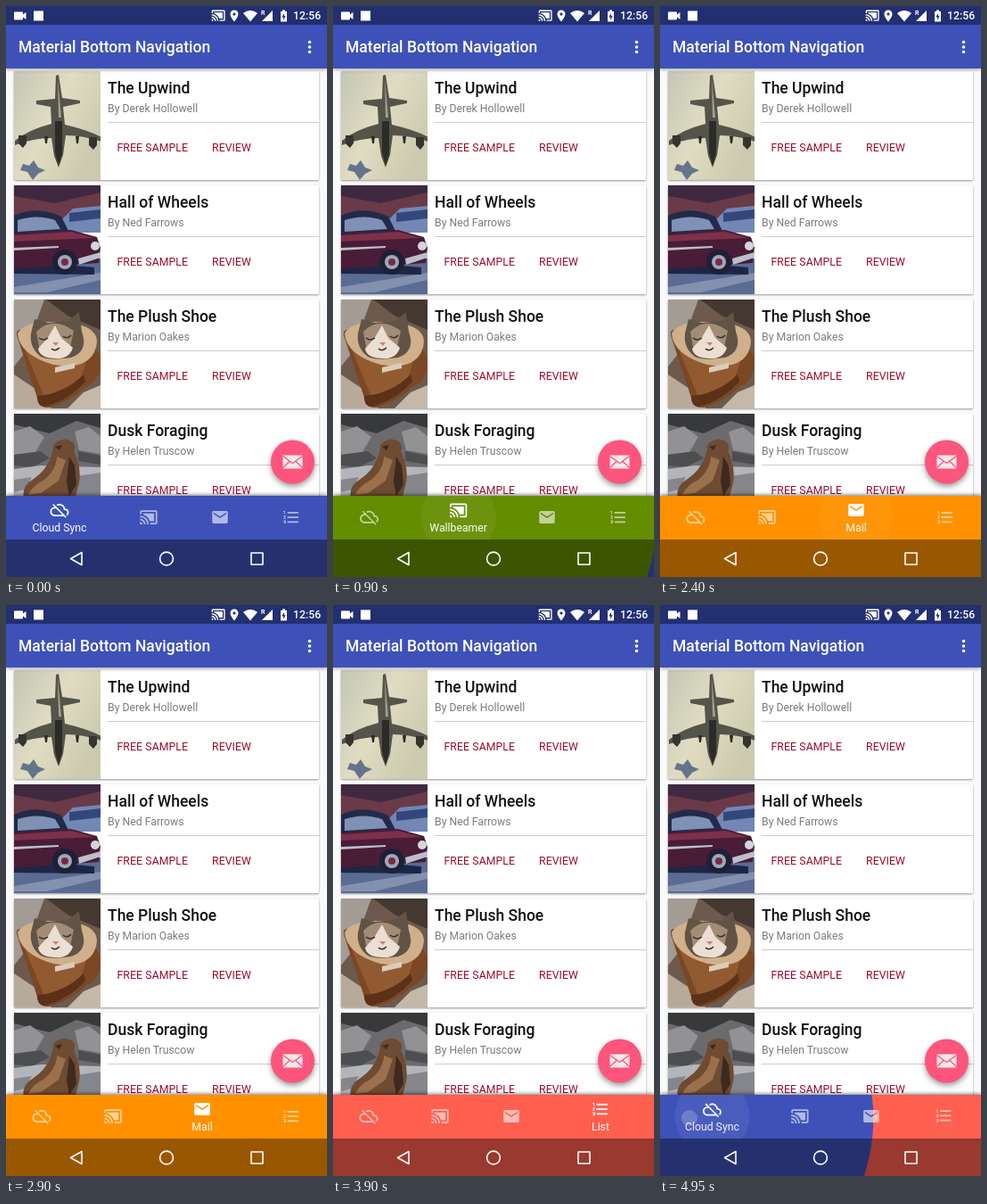
Recreate the animation shown at these times as an HTML page. Size 360 by 640 pixels, loop 5 s.

```html
<!DOCTYPE html>
<html lang="en">
<head>
<meta charset="utf-8">
<title>Material Bottom Navigation</title>
<style>
  html, body { margin: 0; width: 100%; height: 100%; overflow: hidden; }
  svg { display: block; }
  text { font: 400 12.25px Roboto, sans-serif; }
  .title { font-weight: 500; font-size: 17.5px; }
  .by { fill: #7b7b7b; }
  .action { fill: #9c0a2c; letter-spacing: .1px; }
  .card { fill: #fff; filter: drop-shadow(0 1px 1.2px #0006); }
  .raised { filter: drop-shadow(0 1px 2px #0006); }
  .label { fill: #fff; text-anchor: middle; }
</style>
</head>
<body>
<svg id="stage" width="360" height="640" viewBox="0 0 360 640">
  <defs>
    <clipPath id="barClip"><rect y="549" width="360" height="91"/></clipPath>
    <clipPath id="tabClip"><rect y="549" width="360" height="49"/></clipPath>
    <path id="cloud" d="M19.35 10.04C18.67 6.59 15.64 4 12 4c-1.48 0-2.85.43-4.01 1.17l1.46 1.46C10.21 6.23 11.08 6 12 6c3.04 0 5.5 2.46 5.5 5.5v.5H19c1.66 0 3 1.34 3 3 0 1.13-.64 2.11-1.56 2.62l1.45 1.45C23.16 18.16 24 16.68 24 15c0-2.64-2.05-4.78-4.65-4.96zM3 5.27l2.75 2.74C2.56 8.15 0 10.77 0 14c0 3.31 2.69 6 6 6h11.73l2 2L21 20.73 4.27 4 3 5.27zM7.73 10l8 8H6c-2.21 0-4-1.79-4-4s1.79-4 4-4h1.73z"/>
    <path id="cast" d="M1 18v3h3c0-1.66-1.34-3-3-3zm0-4v2c2.76 0 5 2.24 5 5h2c0-3.87-3.13-7-7-7zm18-7H5v1.63c3.96 1.28 7.09 4.41 8.37 8.37H19V7zM1 10v2c4.97 0 9 4.03 9 9h2c0-6.08-4.93-11-11-11zm20-7H3c-1.1 0-2 .9-2 2v3h2V5h18v14h-7v2h7c1.1 0 2-.9 2-2V5c0-1.1-.9-2-2-2z"/>
    <path id="mail" d="M20 4H4c-1.1 0-1.99.9-1.99 2L2 18c0 1.1.9 2 2 2h16c1.1 0 2-.9 2-2V6c0-1.1-.9-2-2-2zm0 4l-8 5-8-5V6l8 5 8-5v2z"/>
    <path id="list" d="M2 17h2v.5H3v1h1v.5H2v1h3v-4H2v1zm1-9h1V4H2v1h1v3zm-1 3h1.8L2 13.1v.9h3v-1H3.2L5 10.9V10H2v1zm5-6v2h14V5H7zm0 14h14v-2H7v2zm0-6h14v-2H7v2z"/>
    <linearGradient id="haze" x2="1" y2=".6">
      <stop stop-color="#c3c6b4"/><stop offset=".5" stop-color="#e0dcc2"/><stop offset="1" stop-color="#cbcaae"/>
    </linearGradient>

    <symbol id="plane" viewBox="0 0 97 122">
      <path fill="url(#haze)" d="M0 0h97v122H0z"/>
      <path fill="#64748a" d="M10 104l7 2 5-6 5 8 8 3-8 4-6 7-6-9-8-2z"/>
      <path fill="#55544a" d="M25 33l21-2 1-26 3-1 4 26 20 3v3l-19 4 2 20q26 6 41 14v5q-20-7-40-7l-3 22-5 14-5-13-3-20q-20 0-41 8v-5q14-12 41-19l-1-19-16-3z"/>
      <path fill="#2b2c27" d="M46 56h8l0 36-4 14-4-15zM34 73h4l-1 8h-2zM69 73h4l-1 8h-2z"/>
      <path fill="#34352f" d="M5 72h9v9l-4 5-5-5zM84 74h9v9l-4 5-5-5z"/>
      <path fill="#a3a18f" d="M49 8l4 44-3 0z"/>
    </symbol>

    <symbol id="car" viewBox="0 0 97 122">
      <path fill="#6a3a49" d="M0 0h97v40H0z"/>
      <path fill="#3f2940" d="M0 0h97v8L45 20 0 12z"/>
      <path fill="#7387b4" d="M52 40l14-14 31-3v30H50z"/>
      <path fill="#34477a" d="M62 31l35-4v10l-35 4z"/>
      <path fill="#5a6b94" d="M0 82h97v40H0z"/>
      <path fill="#8390ae" d="M0 114l97-16v8l-60 14H0z"/>
      <path fill="#1d2745" d="M0 84l90 8v8L0 99z"/>
      <path fill="#222a4a" d="M0 34q25-12 53 1l9 18-62 4z"/>
      <path fill="#7f91b5" d="M4 39q22-7 42 0l6 10-48 3z"/>
      <path fill="#491c38" d="M0 54l64-4 29 8 4 12-2 17-97 7z"/>
      <path fill="#7d3049" d="M0 56l64-4 26 7-90 4z"/>
      <path fill="#bac0ca" d="M0 70l50-2v2L0 73zM72 82l25-7v6l-24 8z"/>
      <circle cx="57" cy="86" r="14" fill="#1d2135"/>
      <circle cx="57" cy="86" r="8" fill="#9fa7bb"/>
      <circle cx="57" cy="86" r="4" fill="#7d2841"/>
      <circle cx="91" cy="68" r="5" fill="#d4d6dc"/>
    </symbol>

    <symbol id="kitten" viewBox="0 0 97 122">
      <path fill="#6d5a4d" d="M0 0h97v122H0z"/>
      <path fill="#a39c94" d="M0 0h34L12 60 0 75z"/>
      <path fill="#443830" d="M36 0h61v34L60 18z"/>
      <path fill="#b8aa99" d="M0 84l30 20 12 18H0z"/>
      <path fill="#c4b8a9" d="M60 122l18-18 19-8v26z"/>
      <path fill="#7b4725" d="M4 43q-4-12 8-8l72 17q10 4 13 14 2 24-17 32-16 16-40 23-13 1-14-11z"/>
      <path fill="#925a31" d="M6 42l76 24-8 26-40 17z"/>
      <path fill="#5b3118" d="M26 108q30-2 52-24l2 8q-20 22-46 28-8 0-8-12z"/>
      <path fill="#cfb08a" d="M4 38Q16 18 76 29q24 8 14 30-10 20-46 14Q6 62 4 38z"/>
      <path fill="#625347" d="M19 38l4-16 15 4 22-2 13-10 3 22q8 22-12 29-24 4-34-1-13-10-11-26z"/>
      <path fill="#a28c76" d="M25 36q18-18 42-1l-4 18H28z"/>
      <path fill="#eadfd2" d="M37 44l9-15 7 14 13 11q-4 13-19 12-18 0-20-11z"/>
      <path fill="none" stroke="#3c3029" stroke-width="1.6" d="M28 43q5 4 10 0M55 41q5 4 9-1M42 55q4 4 9-1"/>
      <path fill="#c58479" d="M43 48h7l-3 4z"/>
      <path fill="#d9cdb9" d="M46 76l22-5v6l-22 5z"/>
    </symbol>

    <symbol id="bear" viewBox="0 0 97 122">
      <path fill="#6b6b6d" d="M0 0h97v122H0z"/>
      <path fill="#38393b" d="M0 0h97v16L70 8 40 22 0 12z"/>
      <path fill="#929295" d="M0 20l18-6 16 12-10 17-24 3zM68 20l16-5 13 10v20l-24-4z"/>
      <path fill="#4d4e50" d="M0 46l30-4 10 8-20 10-20-2zM72 42l25 5v10l-25-4z"/>
      <path fill="#b4b5ba" d="M0 62l30-4 67 2v62H0z"/>
      <path fill="#84868c" d="M70 70l27-4v26H64zM0 74l20-3-8 14-12 3z"/>
      <path fill="#6f4b32" d="M44 39q-1-4 3-7 10-7 19 0 4 4 1 10 9 18 6 35l-4 16-58 2q-3-14 11-22 18-12 22-34z"/>
      <path fill="#9b714d" d="M48 48l10 4-8 23-20 14-14 2q4-10 18-17 14-12 14-26z"/>
      <path fill="#3d2a20" d="M62 48l6 10 2 22-8 12-3-16zM46 37l8-2-3 6z"/>
    </symbol>
  </defs>

  <rect width="360" height="640" fill="#fafafa"/>
  <g id="cards"></g>

  <g class="raised">
    <rect width="360" height="70" fill="#3d51b8"/>
    <rect width="360" height="21" fill="#222f70"/>
  </g>
  <g fill="#fff">
    <path d="M9 7.500q0-1 1-1h8q1 0 1 1v2l3.500-2.500v8L19 12.500v2q0 1-1 1h-8q-1 0-1-1z"/>
    <rect x="31" y="5.500" width="11" height="11"/>
    <use href="#cast" transform="translate(230 2.500) scale(.68)"/>
    <path d="M256 4.500a4.500 4.500 0 0 0-4.500 4.500c0 3.500 4.500 8.500 4.500 8.500s4.500-5 4.500-8.500a4.500 4.500 0 0 0-4.500-4.500zm0 3a1.600 1.600 0 0 1 0 3.200 1.600 1.600 0 0 1 0-3.200z"/>
    <path d="M266 8q8-6 16 0l-8 9.500z"/>
    <path d="M299 5v12h-12z"/>
    <text x="286" y="10" style="font-size:7px;font-weight:700">R</text>
    <path d="M308 6h2V4.500h3V6h2v11.500h-7zm4 2l-2.600 4.500h1.700V16l2.600-4.800H312z"/>
    <text x="322" y="15" style="font-weight:500">12:56</text>
    <text class="title" x="14" y="52">Material Bottom Navigation</text>
    <circle cx="340.500" cy="40.500" r="1.800"/><circle cx="340.500" cy="46" r="1.800"/><circle cx="340.500" cy="51.500" r="1.800"/>
  </g>

  <circle cx="321.500" cy="511" r="24.500" fill="#fd557b" style="filter:drop-shadow(0 3px 3px #0006)"/>
  <rect x="310.500" y="503.500" width="22" height="15" rx="1" fill="#f3e9ec"/>
  <path d="M310.500 504.500l11 8 11-8M310.500 517.500l7.500-7M332.500 517.500l-7.500-7" fill="none" stroke="#fd557b" stroke-width="1.300"/>

  <rect id="base" y="549" width="360" height="91" style="filter:drop-shadow(0 -1px 2px #0008)"/>
  <g clip-path="url(#barClip)">
    <circle id="reveal"/>
    <rect y="598" width="360" height="42" opacity=".4"/>
  </g>
  <g clip-path="url(#tabClip)" fill="#fff">
    <circle id="ripple" cy="573"/>
    <circle id="touch" r="9"/>
  </g>
  <g id="tabs"></g>
  <g fill="none" stroke="#fff" stroke-width="1.600" stroke-linejoin="round">
    <path d="M72.500 619.500l12.500-7v14zM275 613h13v13h-13z"/>
    <circle cx="180" cy="619.500" r="7.400"/>
  </g>
</svg>
<script>
const $ = id => document.getElementById(id);
const set = (el, attrs) => { for (const k in attrs) el.setAttribute(k, attrs[k]); };

const books = [
  ['plane', 'The Upwind', 'Derek Hollowell'],
  ['car', 'Hall of Wheels', 'Ned Farrows'],
  ['kitten', 'The Plush Shoe', 'Marion Oakes'],
  ['bear', 'Dusk Foraging', 'Helen Truscow'],
];
$('cards').innerHTML = books.map(([photo, title, author], i) => `
  <g transform="translate(9 ${73 + i * 128})">
    <rect class="card" width="342" height="122" rx="1.500"/>
    <use href="#${photo}" width="97" height="122"/>
    <text class="title" x="105" y="25" fill="#111">${title}</text>
    <text class="by" x="105" y="46">By ${author}</text>
    <path d="M105 57.500h237" stroke="#ccc"/>
    <text class="action" x="115.500" y="90">FREE SAMPLE</text>
    <text class="action" x="222" y="90">REVIEW</text>
  </g>`).join('');

const tabs = [
  { icon: 'cloud', label: 'Cloud Sync', color: '#3d51b8' },
  { icon: 'cast', label: 'Wallbeamer', color: '#648d00' },
  { icon: 'mail', label: 'Mail', color: '#ff9100' },
  { icon: 'list', label: 'List', color: '#ff5f4f' },
];
$('tabs').innerHTML = tabs.map(({ icon, label }) =>
  `<g><use href="#${icon}" fill="#fff"/><text class="label" y="589">${label}</text></g>`).join('');

const taps = [
  { at: 724, tab: 1, x: 134, y: 566 },
  { at: 2205, tab: 2, x: 215, y: 573 },
  { at: 3268, tab: 3, x: 326, y: 575 },
  { at: 4787, tab: 0, x: 33, y: 575 },
];
const LOOP = 5000, LAYOUT = 200, REVEAL = 300, RADIUS = 360;
const clamp = v => Math.min(1, Math.max(0, v));
const ease = v => (1 - Math.cos(Math.PI * clamp(v))) / 2;

function render(t) {
  const tap = taps.findLast(p => p.at <= t) || { ...taps[3], at: -LOOP };
  const dt = t - tap.at;
  const from = (tap.tab + 3) % 4;
  const shift = ease(dt / LAYOUT);

  let left = 0, center = 0;
  tabs.forEach((tab, i) => {
    const active = i === tap.tab ? shift : i === from ? 1 - shift : 0;
    const width = 80 + 40 * active;
    const x = left + width / 2;
    left += width;
    if (i === tap.tab) center = x;
    const [icon, label] = $('tabs').children[i].children;
    set(icon, {
      transform: `translate(${x - 10.5} ${562.5 - 8 * active}) scale(.875)`,
      opacity: 0.6 + 0.4 * active,
    });
    set(label, { x, opacity: active });
  });

  set($('base'), { fill: tabs[dt < REVEAL ? from : tap.tab].color });
  set($('reveal'), { cx: tap.x, cy: tap.y, r: RADIUS * ease(dt / REVEAL), fill: tabs[tap.tab].color });
  set($('ripple'), { cx: center, r: 42 * clamp(dt / 150), opacity: 0.1 * clamp((230 - dt) / 100) });

  const next = taps.find(p => p.at > t);
  const pressing = next && next.at - t < 80;
  const { x, y } = pressing ? next : tap;
  set($('touch'), { cx: x, cy: y, opacity: pressing || dt < 175 ? 0.2 : 0 });
}

const start = performance.now();
function frame() {
  render((performance.now() - start) % LOOP);
  requestAnimationFrame(frame);
}
frame();
</script>
</body>
</html>
```
